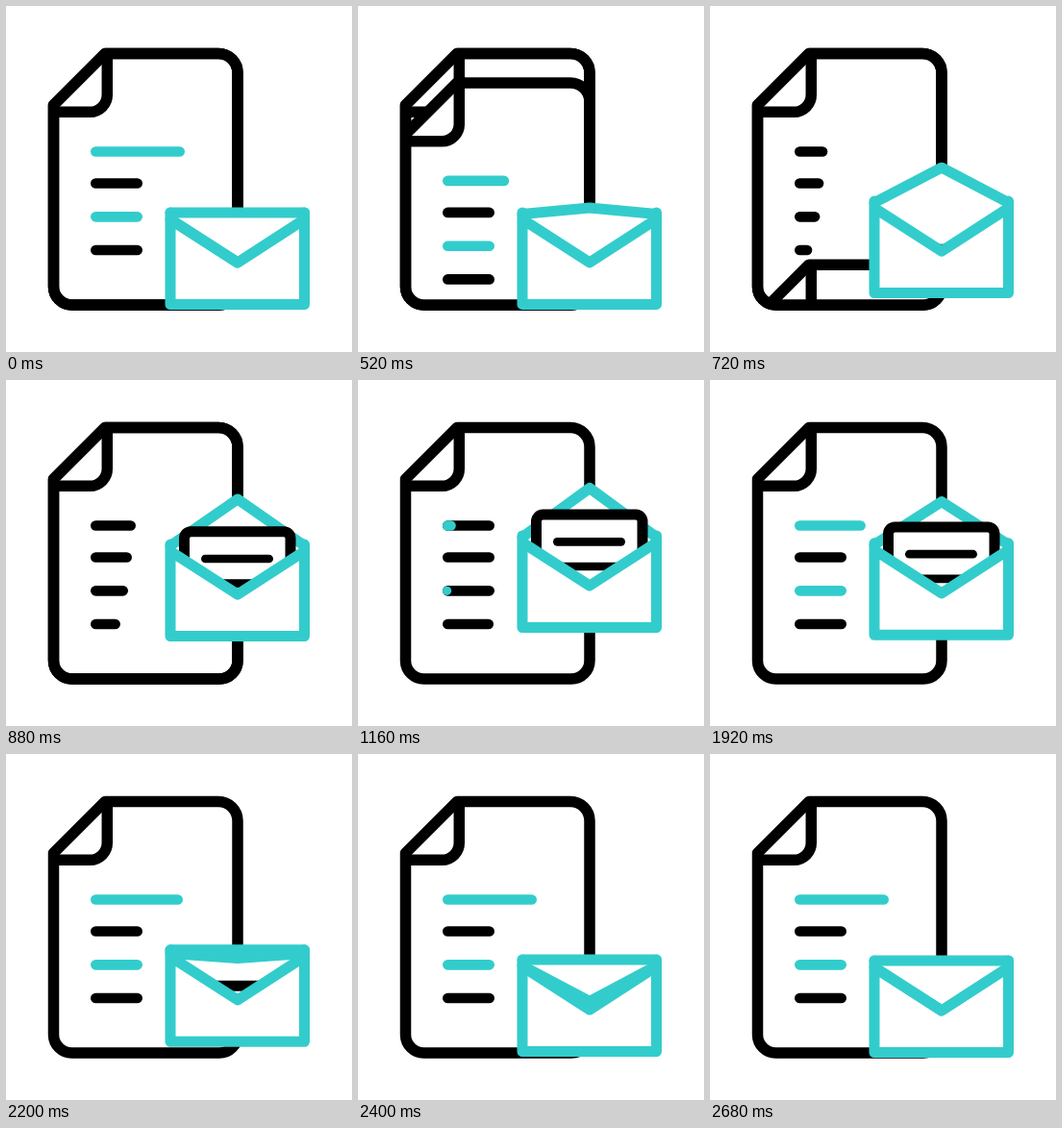
Animation of 360x360 px, one loop 3 s. Source, as an HTML page with a canvas:

```html
<!DOCTYPE html>
<html lang="en">
<head>
<meta charset="utf-8">
<title>Document and mail</title>
<style>
  html, body { margin: 0; width: 100%; height: 100%; overflow: hidden; background: #fff; }
  canvas { display: block; width: 100vmin; height: 100vmin; }
</style>
</head>
<body>
<canvas id="stage"></canvas>
<script>
const SIZE = 360, LOOP = 3000, STEP = 40;
const TEAL = '#33cccc', BLACK = '#000', WHITE = '#fff';
const canvas = document.getElementById('stage');
const ctx = canvas.getContext('2d');

const sheet = new Path2D('M103 49.5H221a20 20 0 0 1 20 20V292a19 19 0 0 1-19 19H68.5a19 19 0 0 1-19-19V103Z');
const fold = new Path2D('M105.3 51V92a18 18 0 0 1-18 18.3H51');
const pocket = new Path2D('M171 222L241 267L310.5 222V310.5H171Z');
const pocketLine = new Path2D('M171 222L241 267L310.5 222M171 215V310.5H310.5V215');

// Text rows: position, colour, width, start of the black and the teal stroke
const rows = [
  { y: 151.5, color: TEAL, width: 98, black: 285, teal: 985 },
  { y: 184.5, color: BLACK, width: 54, black: 336 },
  { y: 219.3, color: TEAL, width: 54, black: 386, teal: 1043 },
  { y: 254, color: BLACK, width: 54, black: 488 }
];
const SPEED = 0.079;

const clamp = (v, lo, hi) => Math.min(hi, Math.max(lo, v));
const span = (t, from, to) => clamp((t - from) / (to - from), 0, 1);
const easeOut = p => 1 - (1 - p) ** 2;
const easeInOut = p => p < 0.5 ? 4 * p ** 3 : 1 - 4 * (1 - p) ** 3;
const move = (t, from, to) => easeInOut(span(t, from, to));

function stroke(path, color, width = 11) {
  ctx.strokeStyle = color;
  ctx.lineWidth = width;
  ctx.stroke(path);
}

function paint(path, color, width) {
  ctx.fillStyle = WHITE;
  ctx.fill(path);
  stroke(path, color, width);
}

function bar(x, y, width, color, height = 10.7) {
  if (width <= 0) return;
  const h = Math.min(height, width);
  const path = new Path2D();
  path.roundRect(x, y - h / 2, width, h, h / 2);
  ctx.fillStyle = color;
  ctx.fill(path);
}

function drawPage() {
  paint(sheet, BLACK, 11.5);
  stroke(fold, BLACK, 11.5);
}

function drawRows(t) {
  for (const r of rows) {
    const teal = r.teal ? clamp((t - r.teal) * SPEED, 0, r.width) : 0;
    if (teal < 54) bar(88, r.y, clamp((t - r.black) * SPEED, 0, 54), BLACK);
    bar(88, r.y, teal, TEAL);
  }
}

function drawDocument(t) {
  drawPage();
  if (t >= 930) return drawRows(t);
  if (t > 280) drawRows(t);
  ctx.save();
  ctx.clip(sheet);
  ctx.translate(0, 268 * move(t, 340, 930));
  drawPage();
  rows.forEach((r, i) => {
    const cut = i ? 0 : Math.max(0, t - 280) * 0.12;
    bar(88, r.y, r.width - cut, r.color);
  });
  ctx.restore();
  stroke(sheet, BLACK, 11.5);
}

function drawFlap(tip) {
  const y = tip > 0 ? 218 + tip * 4 / 52 : 216.5;
  const path = new Path2D(`M171 ${y}L241 ${215 + tip}L310.5 ${y}`);
  paint(path, TEAL);
  if (tip > 0) stroke(new Path2D('M171 215H310.5'), TEAL);
}

function drawLetter(top) {
  const y = 215 + top;
  const path = new Path2D();
  path.roundRect(185.5, y, 110.5, 140, 7);
  ctx.save();
  ctx.beginPath();
  ctx.rect(171, 60, 139.5, 250);
  ctx.clip();
  paint(path, BLACK);
  bar(203, y + 28.3, 75, BLACK, 8.7);
  bar(203, y + 54, 75, BLACK, 8.7);
  ctx.restore();
}

function drawEnvelope(t) {
  const rise = move(t, 490, 1090) - move(t, 1600, 2560);
  const open = easeOut(span(t, 280, 990)) - move(t, 1668, 2680);
  const out = move(t, 470, 1030) - move(t, 1700, 2680);
  const tip = 52 - 101.5 * open;

  ctx.save();
  ctx.translate(0, -53 * rise);
  ctx.fillStyle = WHITE;
  ctx.fillRect(171, 215, 139.5, 95.5);
  if (tip <= 0) drawFlap(tip);
  drawLetter(90 - 112 * out);
  ctx.fillStyle = WHITE;
  ctx.fill(pocket);
  if (tip > 0) drawFlap(tip);
  stroke(pocketLine, TEAL);
  ctx.restore();
}

function draw(now) {
  const t = Math.floor((now % LOOP) / STEP) * STEP;
  const px = Math.round(Math.min(innerWidth, innerHeight) * devicePixelRatio) || SIZE;
  if (canvas.width !== px) canvas.width = canvas.height = px;
  ctx.setTransform(px / SIZE, 0, 0, px / SIZE, 0, 0);
  ctx.lineCap = ctx.lineJoin = 'round';
  ctx.fillStyle = WHITE;
  ctx.fillRect(0, 0, SIZE, SIZE);
  drawDocument(t);
  drawEnvelope(t);
}

const start = performance.now();
function tick() {
  draw(performance.now() - start);
  requestAnimationFrame(tick);
}
tick();
</script>
</body>
</html>
```
